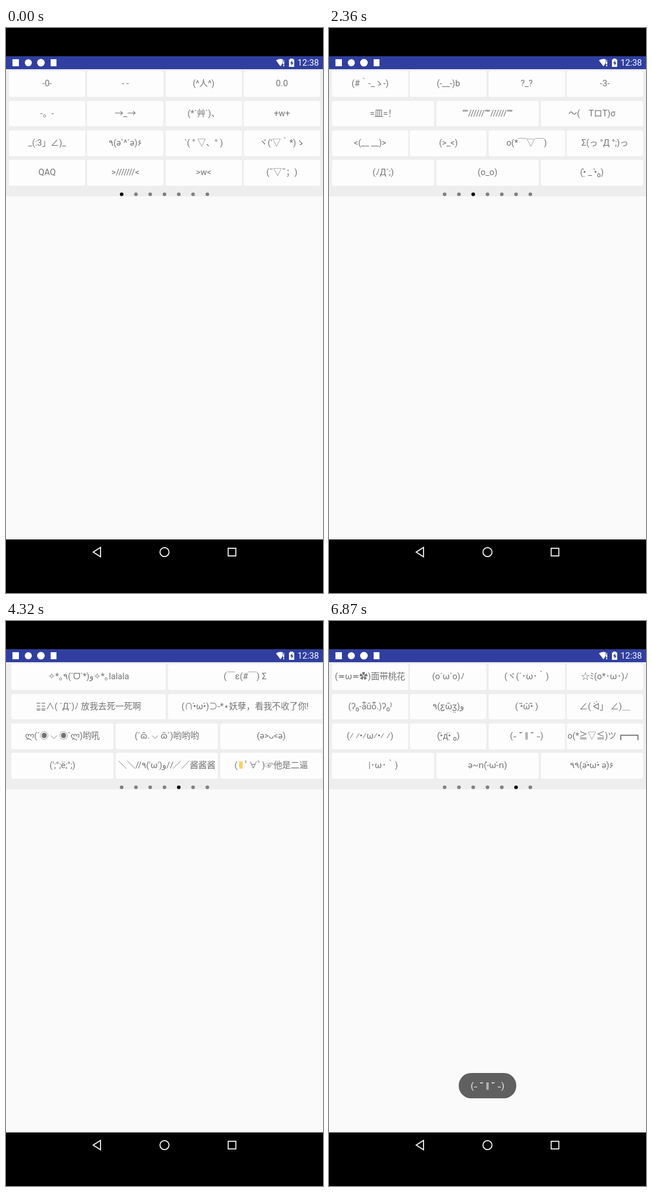
Recreate the animation shown at these times as an HTML page. Size 540 px wide and 960 px high, loop 8 s.

```html
<!DOCTYPE html>
<html lang="zh">
<head>
<meta charset="utf-8">
<title>Emoticon pager</title>
<style>
  html, body { margin: 0; height: 100%; overflow: hidden; background: #000; }
  #stage {
    position: relative; width: 540px; height: 960px; overflow: hidden; background: #000;
    font: 14.67px Roboto, "Noto Sans CJK SC", "Noto Sans CJK JP", "DejaVu Sans", sans-serif;
    text-spacing-trim: space-all;
  }
  #stage > * { position: absolute; }
  #bar { top: 48px; width: 540px; height: 22px; background: #303f9f; }
  #screen { top: 70px; width: 540px; height: 799px; background: #fafafa; }
  #panel { top: 70px; width: 540px; height: 216px; background: #eee; overflow: hidden; }
  #strip { display: flex; width: max-content; }
  .page { width: 530px; padding: 3.2px 5px 0; }
  .row { display: flex; gap: 3.33px; height: 43.6px; margin-bottom: 6.8px; }
  .cell {
    flex: 1 1 0; min-width: 0; border-radius: 3px; background: #fdfdfd; color: #737373;
    display: flex; justify-content: center; line-height: 43.6px; white-space: pre;
  }
  .cell span, #toast span { direction: ltr; unicode-bidi: bidi-override; }
  .cell b { font-weight: 400; color: #fbcf58; -webkit-text-stroke: 1.5px #fbcf58; }
  #toast {
    left: 221px; top: 768px; width: 98px; height: 43px; border-radius: 21px;
    background: #606060; color: #fafafa; text-align: center; line-height: 44px; white-space: pre;
  }
  svg { left: 0; top: 0; }
</style>
</head>
<body>
<div id="stage">
  <div id="bar"></div>
  <div id="screen"></div>
  <div id="panel"><div id="strip"></div></div>
  <svg width="540" height="960">
    <g fill="#fff">
      <rect x="11" y="53" width="11" height="12"/>
      <circle cx="38" cy="59" r="6"/>
      <circle cx="59.500" cy="59" r="6.500"/>
      <rect x="76" y="53" width="10" height="12"/>
      <path d="M460 55q7.500-4.500 15 0l-7.500 10z" opacity=".45"/>
      <path d="M460 55q6-3.500 11-2v7l-3.500 5z"/>
      <path d="M472 57h2v5h-2zm0 6h2v2h-2z"/>
      <path d="M484 52h5v1.500h2V66h-9V53.500h2z"/>
      <text x="496.500" y="64.200">12:38</text>
    </g>
    <path d="M487.500 55l-3.500 5h2.300v4l3.500-5.300h-2.300z" fill="#303f9f"/>
    <g fill="none" stroke="#fff" stroke-width="1.700">
      <path d="M148.500 890.500L161 882.500V898.500z"/>
      <circle cx="270" cy="890.500" r="7.700"/>
      <rect x="378.500" y="884" width="13" height="13"/>
    </g>
    <g id="dots"></g>
  </svg>
  <div id="toast"><span>(˶ ˉ̌ ‖ ˉ̌ ˵)</span></div>
</div>

<script type="text/plain" id="faces">
-0-¦- -¦(^人^)¦0.0
-。-¦→_→¦(*´艸`)、¦+w+
_(:3」∠)_¦٩(ə`^´ə)۶¦`( ° ▽、° )¦ヾ('▽｀*)ゝ
QAQ¦>///////<¦>w<¦(¯▽¯；)

Σ( ° △ °|||)︴¦+w+~~~~~~~¦(╯`□')╯···*～●¦(╯`□')╯︵┻━┻
╭(╯ ^ ╰)╮¦=.=||¦Σ(｀д'*ノ)ノ
(〃￣︶￣)人(￣︶￣〃)¦('д｀σ)σ¦-_-!
⊙﹏⊙‖∣¦o(>﹏<)o¦(#‵′)凸¦●▂●

(#｀-_ゝ-)¦(-__-)b¦?_?¦-3-
=皿=！¦“”//////“”//////“”¦～(　TロT)σ
<(__ __)>¦(>_<)¦o(*￣▽￣)¦Σ(っ °Д °;)っ
(ﾉД`;)¦(o_o)¦(•̤̀ _ •̀ₒ)

( *・ω・)✄╰ひ╯ 剪叽叽¦(;´ǁ̂Дǁ̂` 【爽】¦(*´∀`*)
_(´ɱ`」 ∠)_¦(｡･ω･｡)ﾉ♡
(ə╹ڡ╹)╭ ～ ♡~~耐你~~¦ヾ(≧∇≦*)ゝ
( ͡° ͜ʖ ͡°)•ₒ¦( º⌓º)¦ԅ(¯⌓¯ԅ)¦(つД`)

✧*｡٩(ˊᗜˋ*)و✧*｡lalala¦(￣ε(#￣) Σ
Ξ̲Ξ̲∧( ´Д`)ﾉ 放我去死一死啊¦(∩•̀ω•́)⊃-*⋆妖孽，看我不收了你!
ლ(´◉ ⌵ ◉`ლ)哟吼¦(´ɷ̄. ⌵ ɷ̄`)哟哟哟¦(ə>ᴗ<ə)
(';°;ё;°;)¦＼＼//٩('ω')و//／／酱酱酱¦(✌ﾟ∀ﾟ)☞他是二逼

(≖ω≖✿)面带桃花¦(o´ω`o)ﾉ¦(ヾ(´･ω･｀)¦☆ﾐ(o*･ω･)ﾉ
(ʔₒ-ā̃ʊ̄ō̃.)ʔₒ⁾¦٩(ƹ̤ω̄ʒ̤)و¦( •̃ω̂•̃ )¦∠( ᐛ」 ∠)＿
(⁄ ⁄•⁄ω⁄•⁄ ⁄)¦(•̤̈д•̤̈ ₒ)¦(˶ ˉ̌ ‖ ˉ̌ ˵)¦o(*≧▽≦)ツ┏━┓
|･ω･｀)¦ə~ո(-̀ω-́ո)¦٩٩(ə•̀ω•́ ə)۶
</script>

<script>
const LOOP = 8000, WIDTH = 540;
const $ = id => document.getElementById(id);
const clamp = v => Math.min(1, Math.max(0, v));

const wrap = (name, parts) => parts.map(p => `<div class="${name}">${p}</div>`).join('');
const cellText = s => `<span>${s.replace(/</g, '&lt;').replace('✌', '<b>✌\uFE0E</b>')}</span>`;
const rowHtml = line => wrap('cell', line.split('¦').map(cellText));
$('strip').innerHTML = wrap('page', $('faces').textContent.trim().split('\n\n')
  .map(page => wrap('row', page.split('\n').map(rowHtml))));

$('dots').innerHTML = Array.from({ length: 7 }, (_, i) =>
  `<circle cx="${197 + i * 24.33}" cy="282.500" r="3.100"/>`).join('');
const dots = [...$('dots').children];
const pressed = document.querySelector('.page:last-child .row:nth-child(3) .cell:nth-child(3)');

// Swipes: start, duration, drag acceleration, settling strength
const swipes = [
  [1010, 450, 3, 10.97],
  [1910, 450, 3, 9.82],
  [3000, 600, 2, 6.592],
  [3870, 630, 2, 6.408],
  [4800, 720, 2, 6.956],
];

function swipeProgress(t, [start, duration, accel, settle]) {
  if (t < start) return 0;
  const u = clamp((t - start + 40) / (duration + 40));
  return 1 - (1 - u ** accel) ** settle;
}

function draw() {
  const t = performance.now() % LOOP;
  const page = swipes.reduce((sum, swipe) => sum + swipeProgress(t, swipe), 0);
  $('strip').style.transform = `translateX(${-Math.round(page * WIDTH)}px)`;
  dots.forEach((dot, i) => dot.setAttribute('fill', i === Math.round(page) ? '#000' : '#808080'));

  const press = clamp((t - 6150) / 120) * clamp((6560 - t) / 200);
  const shade = 253 - 30 * press;
  pressed.style.background = `rgb(${shade}, ${shade}, ${shade})`;
  $('toast').style.opacity = clamp((t - 6400) / 450);
  requestAnimationFrame(draw);
}
draw();
</script>
</body>
</html>
```
